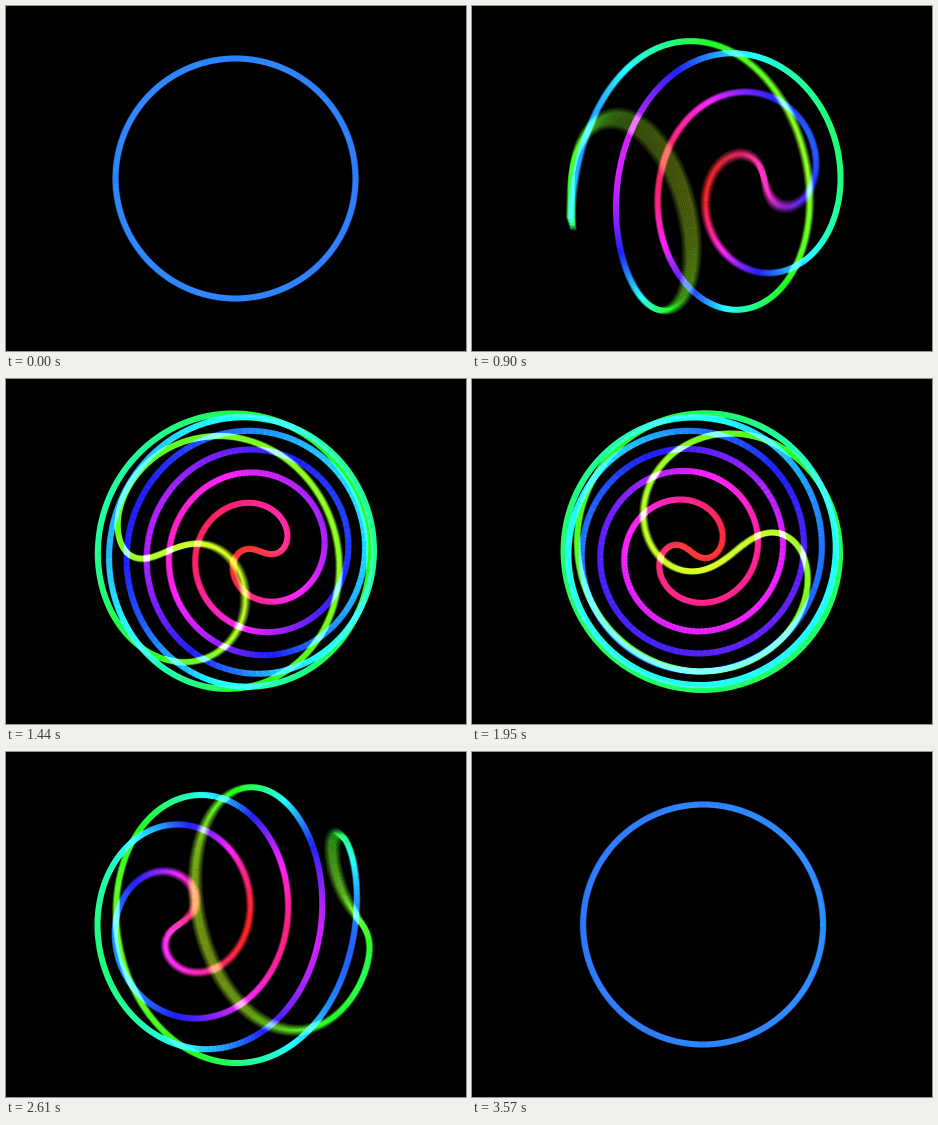
Animation, 460 px wide and 345 px high, one loop 3600 ms. Source, as an HTML page with a canvas:

```html
<!DOCTYPE html>
<html>
<head>
<meta charset="utf-8">
<title>Twisting ring</title>
<style>
html, body { margin: 0; height: 100%; overflow: hidden; background: #000; }
canvas { display: block; }
</style>
</head>
<body>
<canvas id="stage" width="460" height="345"></canvas>
<script>
const ctx = document.getElementById('stage').getContext('2d', { alpha: false });
const LOOP = 3600, STEP = 30, SHUTTER = 18;
const SAMPLES = 10, SEGMENTS = 1200;
const RADIUS = 120, CAMERA = 2;
const MAX_TWIST = 670 * Math.PI / 180;

const easeCubic = x => x < 0.5 ? 4 * x ** 3 : 1 - 4 * (1 - x) ** 3;

// A great circle twisted about its own axis while that axis turns past the viewer.
function ringPoint(s, turn, twist) {
  const along = Math.cos(s), out = Math.sin(s), angle = twist * along;
  const side = out * Math.sin(angle);
  const x = -along * Math.cos(turn) - side * Math.sin(turn);
  const y = out * Math.cos(angle);
  const z = along * Math.sin(turn) - side * Math.cos(turn);
  const scale = RADIUS * CAMERA / (CAMERA - z);
  return { x: 230 + x * scale, y: 172.5 - y * scale, z };
}

function drawRing(time) {
  const u = time / LOOP % 1;
  const turn = Math.PI * u;
  const twist = MAX_TWIST * easeCubic(1 - Math.abs(1 - 2 * u));
  let a = ringPoint(0, turn, twist);
  for (let i = 1; i <= SEGMENTS; i++) {
    const b = ringPoint(i / SEGMENTS * 2 * Math.PI, turn, twist);
    ctx.strokeStyle = `hsl(${216 - 72 * (a.z + b.z)}, 100%, 55%)`;
    ctx.beginPath();
    ctx.moveTo(a.x, a.y);
    ctx.lineTo(b.x, b.y);
    ctx.stroke();
    a = b;
  }
}

function draw(time) {
  ctx.globalCompositeOperation = 'source-over';
  ctx.globalAlpha = 1;
  ctx.fillStyle = '#000';
  ctx.fillRect(0, 0, 460, 345);
  // Motion blur: add up faint copies across the open shutter.
  ctx.globalCompositeOperation = 'lighter';
  ctx.globalAlpha = 1 / SAMPLES;
  ctx.lineWidth = 6;
  for (let i = 0; i < SAMPLES; i++) drawRing(time + SHUTTER * (i + 0.5) / SAMPLES);
}

let shown = -1;
function tick(now) {
  const time = Math.floor(now % LOOP / STEP) * STEP;
  if (time !== shown) draw(shown = time);
  requestAnimationFrame(tick);
}
requestAnimationFrame(tick);
</script>
</body>
</html>
```
